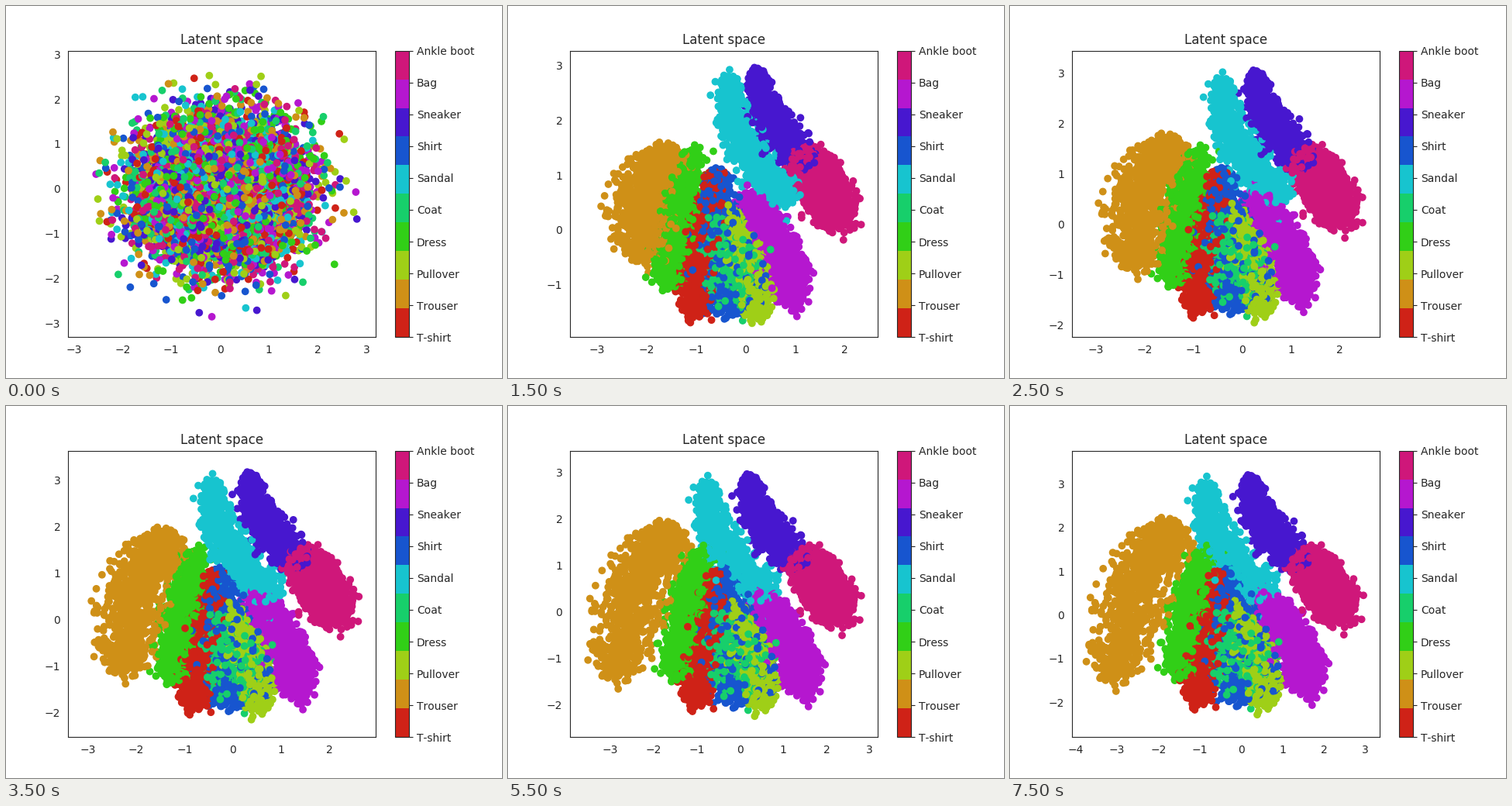
Write a matplotlib script that moves like this. It is 640 px wide and 480 px high and loops after 8000 ms.

```python
import colorsys

import numpy as np
import matplotlib.pyplot as plt
from matplotlib.animation import FuncAnimation
from matplotlib.colors import ListedColormap

FRAMES, INTERVAL = 16, 500
COUNT = 10000
INK = "0.15"

# Axes box in stage pixels, and the part of it the data fills
LEFT, RIGHT, TOP, BOTTOM = 80, 476.8, 57.6, 427.2
FILL_LO, FILL_HI = np.array([98, 75]), np.array([458, 410])

# Classes as curved bands in stage pixels:
# start x, y, end x, y, bend, half width at start and end, sideways drift
BANDS = {
    "T-shirt": (266, 215, 238, 400, 3, 16, 26, 3),
    "Trouser": (212, 186, 175, 330, 17, 38, 44, 0),
    "Pullover": (286, 266, 324, 400, 0, 18, 26, 6),
    "Dress": (238, 190, 206, 362, 3, 17, 25, 13),
    "Coat": (268, 275, 305, 385, 0, 30, 36, 8),
    "Sandal": (284, 92, 366, 250, 21, 13, 34, -32),
    "Shirt": (268, 212, 294, 396, 8, 18, 58, 13),
    "Sneaker": (320, 86, 388, 206, 13, 15, 28, -11),
    "Bag": (307, 246, 372, 385, -8, 23, 24, 17),
    "Ankle boot": (376, 188, 432, 282, -4, 28, 32, -2),
}
NAMES = list(BANDS)
TROUSER = NAMES.index("Trouser")

# Axis limits by step: xmin, xmax, ymin, ymax
LIMITS = {
    0: (-3.116, 3.19, -3.31, 3.08),
    1: (-3.2, 2.6, -1.6, 2.8),
    3: (-3.55, 2.66, -1.967, 3.275),
    7: (-3.416, 2.963, -2.53, 3.63),
    9: (-3.85, 3.10, -2.63, 3.31),
    15: (-4.09, 3.344, -2.80, 3.76),
}

rng = np.random.default_rng(7)
label = rng.integers(0, len(NAMES), COUNT)
cloud = rng.normal(0, 1, (COUNT, 2))
cloud *= np.minimum(1, 3.75 / np.hypot(*cloud.T))[:, None]
along = rng.random(COUNT) ** np.where(label == TROUSER, 1.4, 1)
across = np.clip(rng.normal(0, 0.5, COUNT), -1.1, 1.1)
jitter = np.clip(rng.standard_t(4, (COUNT, 2)) * 3.2, -26, 26)


def band_points():
    """Points spread along and across the bent spine of their class."""
    band = np.array(list(BANDS.values()), float)[label]
    start, end = band[:, :2], band[:, 2:4]
    bend, w0, w1 = band[:, 4:7].T
    u = along
    chord = end - start
    normal = chord[:, ::-1] * (-1, 1) / np.hypot(*chord.T)[:, None]
    rounding = np.sqrt(1 - (2*u - 1) ** 4)
    side = 4*u * (1 - u) * bend + across * rounding * (w0 + (w1 - w0) * u)
    return start + chord * u[:, None] + normal * side[:, None], band[:, 7]


home, drift = band_points()
# Bands drift sideways and settle; the trousers fan out to the lower left
fan = along ** 2
travel = np.column_stack([
    np.where(label == TROUSER, -45 * fan, drift),
    np.where(label == TROUSER, 57 * fan - 32, (200 - home[:, 1]) / 12),
])


def places(step):
    """Stage pixel positions of all points."""
    if step == 0:
        return (277, 240) + cloud * (48, 43)
    settle = (1 - np.exp(-max(step - 3, 0) / 5)) / (1 - np.exp(-12 / 5))
    blur = 1 + max(3 - step, 0) / 2
    pts = home + travel * settle + jitter * blur
    # Fold strays back inside
    pts = FILL_LO + abs(pts - FILL_LO)
    return FILL_HI - abs(FILL_HI - pts)


plt.rcParams.update({
    "font.family": "DejaVu Sans", "text.color": INK, "axes.edgecolor": INK,
    "xtick.color": INK, "ytick.color": INK, "text.kerning_factor": 6,
})
cmap = ListedColormap(
    [colorsys.hls_to_rgb(i / 10 + 0.01, 0.45, 0.8) for i in range(10)])

fig, ax = plt.subplots(figsize=(6.4, 4.8), dpi=100)
dots = ax.scatter(*cloud.T, c=label, cmap=cmap, vmin=0, vmax=9)
bar = fig.colorbar(dots, ax=ax, ticks=range(10))
bar.ax.set_yticklabels(NAMES)
ax.tick_params(bottom=False, left=False)
ax.set_title("Latent space")


def draw(step):
    x0, x1, y0, y1 = [np.interp(step, list(LIMITS), edge)
                      for edge in zip(*LIMITS.values())]
    px, py = places(step).T
    x = x0 + (px - LEFT) / (RIGHT - LEFT) * (x1 - x0)
    y = y0 + (BOTTOM - py) / (BOTTOM - TOP) * (y1 - y0)
    dots.set_offsets(np.column_stack([x, y]))
    ax.set(xlim=(x0, x1), ylim=(y0, y1))
    return dots,


anim = FuncAnimation(fig, draw, frames=FRAMES, interval=INTERVAL,
                     repeat=True, repeat_delay=0)
plt.show()
```
